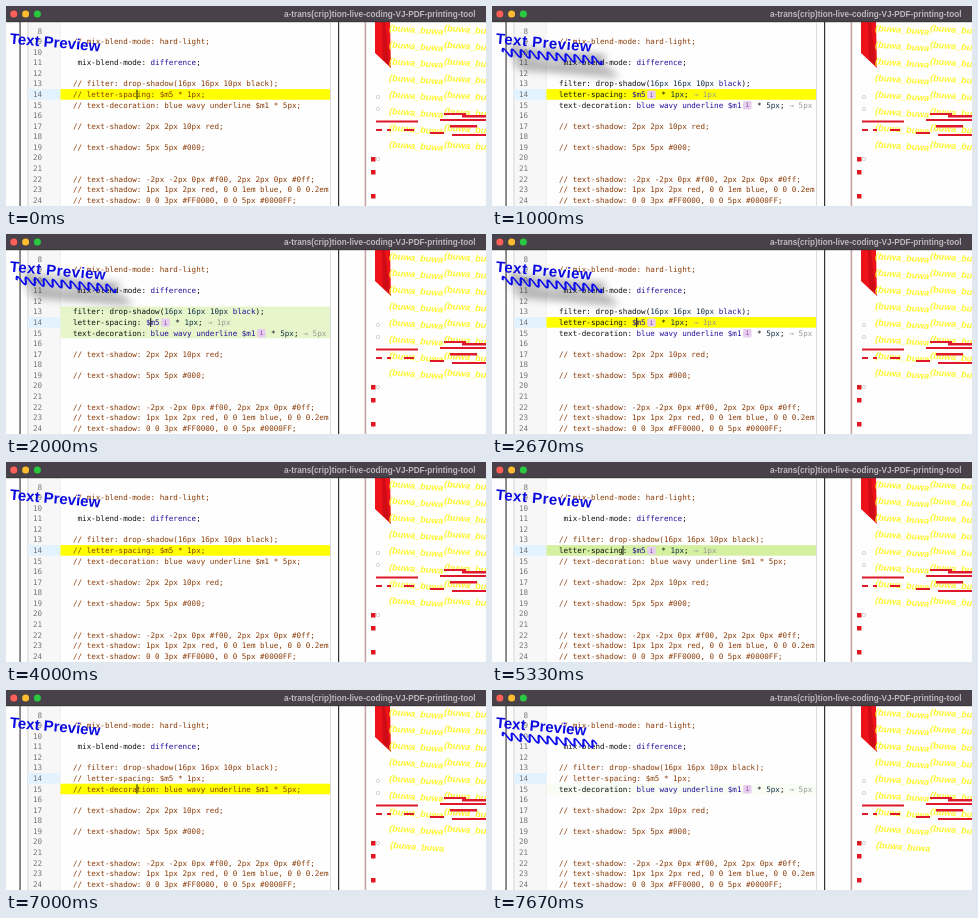
An HTML page for the animation above (8000 ms loop, 480 px wide and 200 px high).

```html
<!DOCTYPE html>
<html lang="en">
<head>
<meta charset="utf-8">
<title>Live coding editor</title>
<style>
html, body { margin: 0; width: 100%; height: 100%; overflow: hidden; background: #fefefe; }
svg { display: block; width: 480px; height: 200px; }
text { white-space: pre; }
.code { font: 7.58px "DejaVu Sans Mono", monospace; }
.num { fill: #777; text-anchor: end; }
.badge { font-size: 6.5px; fill: #84a; text-anchor: middle; }
.title { font: bold 8.2px "Liberation Sans", Arial, sans-serif; fill: #bdb8bc; }
.preview text { font: bold 15px "Liberation Sans", Arial, sans-serif; fill: #0a0ae0; }
.wave { fill: none; stroke: #0a0af0; stroke-width: 2; }
.scribble { font: italic bold 9px "Liberation Sans", Arial, sans-serif; fill: #fbf630; }
</style>
</head>
<body>
<svg id="stage" viewBox="0 0 480 200"></svg>
<script>
const CHAR = 4.564, LEFT = 67, PITCH = 10.58;
const COMMENT = '#8a3c08', PLAIN = '#111', ATOM = '#219', NUMBER = '#14324a';
const stage = document.getElementById('stage');
const lineY = n => 88.4 + (n - 14) * PITCH;

const lines = {
  9: '// mix-blend-mode: hard-light;',
  11: ' mix-blend-mode: difference;',
  17: '// text-shadow: 2px 2px 10px red;',
  19: '// text-shadow: 5px 5px #000;',
  22: '// text-shadow: -2px -2px 0px #f00, 2px 2px 0px #0ff;',
  23: '// text-shadow: 1px 1px 2px red, 0 0 1em blue, 0 0 0.2em',
  24: '// text-shadow: 0 0 3px #FF0000, 0 0 5px #0000FF;'
};
// Each live line: text before the info badge, text after it, computed value
const live = {
  13: ['filter: drop-shadow(16px 16px 10px black);'],
  14: ['letter-spacing: $m5', ' * 1px;', '→ 1px'],
  15: ['text-decoration: blue wavy underline $m1', ' * 5px;', '→ 5px']
};

// on: active lines, mark: yellow line, flash: [lines, strength],
// caret: [line, column], extra: one more printed row
const all = [13, 14, 15];
const steps = [
  [0, { mark: 14, caret: [14, 14] }],
  [670, { on: all, mark: 14 }],
  [1330, { on: all, mark: 14, caret: [14, 17] }],
  [1670, { on: all, flash: [all, 1], caret: [14, 17] }],
  [2000, { on: all, flash: [all, .55], caret: [14, 17] }],
  [2330, { on: all, flash: [all, .12], caret: [14, 17] }],
  [2670, { on: all, mark: 14, caret: [14, 17] }],
  [3330, { mark: 14 }],
  [4330, { mark: 14, caret: [14, 14] }],
  [5000, { mark: 14 }],
  [5330, { on: [14], flash: [[14], 1], caret: [14, 14] }],
  [5670, { flash: [[14], .5], caret: [14, 14] }],
  [6000, { mark: 14, caret: [14, 14] }],
  [6330, { mark: 14, extra: true }],
  [6670, { mark: 14, caret: [14, 14], extra: true }],
  [7000, { mark: 15, caret: [15, 14], extra: true }],
  [7330, { on: [15], flash: [[15], .7], extra: true }],
  [7670, { on: [15], flash: [[15], .12], extra: true }]
];

const rect = (x, y, w, h, fill, more = '') =>
  `<rect x="${x}" y="${y}" width="${w}" height="${h}" fill="${fill}" ${more}/>`;
const text = (x, y, body, cls = 'code', more = '') =>
  `<text x="${x}" y="${y}" class="${cls}" ${more}>${body}</text>`;
const code = (x, n, body, color) => text(x, lineY(n) + 2.6, body, 'code', `fill="${color}"`);
const band = (n, fill, opacity = 1) =>
  rect(54.5, lineY(n) - PITCH / 2, 269.5, PITCH, fill, `opacity="${opacity}"`);

function paint(body) {
  const words = /(\d+px)|(\b(?:black|blue|wavy|underline|difference)\b|\$m\d)/g;
  return body.replace(words, (word, number) =>
    `<tspan fill="${number ? NUMBER : ATOM}">${word}</tspan>`);
}

function liveLine(n, on) {
  const [head, tail = '', value] = live[n];
  if (!on) return code(LEFT, n, '// ' + head + tail, COMMENT);
  let out = code(LEFT, n, paint(head), PLAIN);
  if (value) {
    const x = LEFT + head.length * CHAR, y = lineY(n), end = x + 11 + tail.length * CHAR;
    out += rect(x + 1.5, y - 4, 8.5, 8.4, '#e7cdee', 'rx="1.5"') +
      text(x + 5.8, y + 2.3, 'i', 'code badge') +
      code(x + 11, n, paint(tail), PLAIN) +
      code(end + 5, n, value, '#999');
  }
  return out;
}

function wave(x, y, width) {
  const half = 4.5;
  const turns = `t${half} 0`.repeat(Math.round(width / half) - 1);
  return `<path class="wave" transform="translate(${x} ${y}) skewX(28)" ` +
    `d="M0 0q${half / 2} -7 ${half} 0${turns}"/>`;
}

function preview(on) {
  const spaced = on.includes(14);
  const shadow = on.includes(13) ? 'style="filter:drop-shadow(13px 12px 4px rgba(0,0,0,.8))"' : '';
  return `<g class="preview" ${shadow}><g transform="translate(3.5 37.5) rotate(5)">` +
    `<text letter-spacing="${spaced ? .5 : 0}">Text Preview</text>` +
    (on.includes(15) ? wave(8, 8, spaced ? 99 : 93) : '') + '</g></g>';
}

function scribble(x, y) {
  return `<g transform="translate(${x} ${y}) rotate(4)">${text(0, 0, '(buwa_buwa', 'scribble')}</g>`;
}

function printout(extra) {
  let out = rect(324, 17, .8, 183, '#d4d4d4') + rect(332, 16, 1.2, 184, '#333') +
    rect(358.6, 16, 1.6, 184, '#c8a5a5') +
    '<path d="M369 16H384L385 62L369 47Z" fill="#ee1118"/>' +
    '<path d="M376 16H379L384 60L377 54Z" fill="#cf0c16"/>';
  for (let i = 0; i < 8; i++) {
    const y = 25 + i * 16.6;
    out += scribble(383, y) + scribble(438, y);
  }
  if (extra) out += scribble(384, 158);
  const bars = [[438, 107, 22, 2], [456, 109, 24, 2.5], [370, 114.5, 42, 2], [434, 113, 46, 2],
    [444, 119, 27, 2.5], [370, 123, 6, 2], [381, 123, 4, 2], [398, 123, 10, 2],
    [424, 126, 14, 2], [446, 128, 34, 2]];
  bars.forEach(([x, y, w, h]) => out += rect(x, y, w, h, '#e0182c'));
  [153, 166, 190].forEach(y => out += rect(365, y - 2, 4.5, 4.5, '#e01822'));
  [91, 103, 153].forEach(y =>
    out += `<circle cx="372" cy="${y}" r="1.7" fill="none" stroke="#bbb" stroke-width=".6"/>`);
  return out;
}

function titleBar() {
  const lights = ['#ff5f57', '#febc2e', '#28c840'];
  return rect(0, 0, 480, 16, '#48414a') + rect(0, 15.4, 480, .8, '#333') +
    lights.map((c, i) => `<circle cx="${7.8 + i * 11.8}" cy="8" r="3.5" fill="${c}"/>`).join('') +
    text(278, 10.9, 'a-trans(crip)tion-live-coding-VJ-PDF-printing-tool', 'title');
}

function draw({ on = [], mark, flash, caret, extra }) {
  let out = rect(13.5, 16, 1.1, 184, '#333') + rect(22, 16, 32, 184, '#f7f7f7') +
    rect(21.5, 16, .8, 184, '#ccc') + rect(54, 16, .5, 184, '#e4e4e4') +
    rect(22, lineY(14) - PITCH / 2, 32, PITCH, '#e2f2ff');
  if (mark) out += band(mark, '#ff0');
  if (flash) flash[0].forEach(n => out += band(n, '#d4f0a0', flash[1]));
  for (let n = 8; n <= 24; n++) out += text(36, lineY(n) + 2.6, n, 'code num');

  out += '<svg width="324" height="200">';
  for (const n in lines) {
    const comment = lines[n].startsWith('//');
    out += code(LEFT, n, comment ? lines[n] : paint(lines[n]), comment ? COMMENT : PLAIN);
  }
  all.forEach(n => out += liveLine(n, on.includes(n)));
  if (caret) out += rect(LEFT + caret[1] * CHAR - .4, lineY(caret[0]) - 4.6, 1, 9.2, '#111');
  out += '</svg>';

  stage.innerHTML = out + printout(extra) + preview(on) + titleBar();
}

let shown;
function tick() {
  const t = performance.now() % 8000;
  const step = steps.findLast(([start]) => start <= t);
  if (step !== shown) draw((shown = step)[1]);
  requestAnimationFrame(tick);
}
tick();
</script>
</body>
</html>
```
